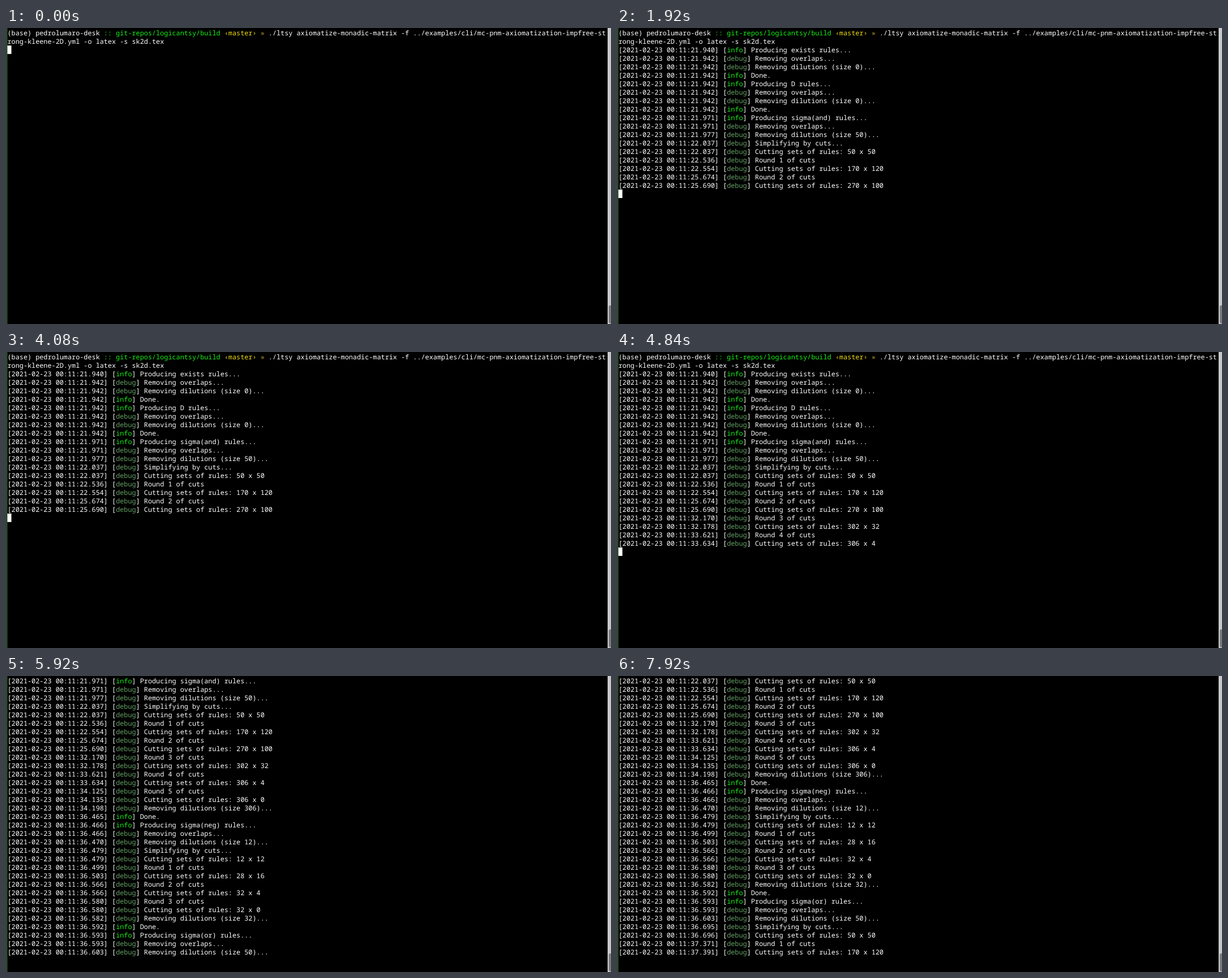
Animation of 1069x524 px, one loop 8 s. Source, as an HTML page:

```html
<!DOCTYPE html>
<html lang="en">
<head>
<meta charset="utf-8">
<title>Terminal log</title>
<style>
  html, body { margin: 0; width: 100%; height: 100%; overflow: hidden; background: #000; }
  svg { display: block; width: 1069px; height: 524px; }
  text {
    font: 500 11.83px "Noto Sans Mono", "DejaVu Sans Mono", monospace;
    fill: #fff; white-space: pre; text-rendering: geometricPrecision;
    font-variant-ligatures: none;
  }
  .green { fill: #18f018; }
  .dim { fill: #65a065; }
  .yellow { fill: #f0dc10; }
  .gold { fill: #c0a818; }
</style>
</head>
<body>
<svg viewBox="0 0 1069 524">
  <rect width="1069" height="524"/>
  <rect x="1" width="1" height="524" fill="#62a05a"/>
  <g id="lines"></g>
  <rect id="cursor" x="2.5" width="7" height="15" fill="#fff"/>
  <rect x="1063" width="6" height="524" fill="#c8c8c8"/>
  <rect x="1065" y="491" width="8" height="32" rx="3" fill="#7c7c7c"/>
</svg>
<script>
const LOOP = 8000, ROW = 15, LAST_ROW = 33;

const log = `21.940 Producing exists rules...
21.942 Removing overlaps...
21.942 Removing dilutions (size 0)...
21.942 Done.
21.942 Producing D rules...
21.942 Removing overlaps...
21.942 Removing dilutions (size 0)...
21.942 Done.
21.971 Producing sigma(and) rules...
21.971 Removing overlaps...
21.977 Removing dilutions (size 50)...
22.037 Simplifying by cuts...
22.037 Cutting sets of rules: 50 x 50
22.536 Round 1 of cuts
22.554 Cutting sets of rules: 170 x 120
25.674 Round 2 of cuts
25.690 Cutting sets of rules: 270 x 100
32.170 Round 3 of cuts
32.178 Cutting sets of rules: 302 x 32
33.621 Round 4 of cuts
33.634 Cutting sets of rules: 306 x 4
34.125 Round 5 of cuts
34.135 Cutting sets of rules: 306 x 0
34.198 Removing dilutions (size 306)...
36.465 Done.
36.466 Producing sigma(neg) rules...
36.466 Removing overlaps...
36.470 Removing dilutions (size 12)...
36.479 Simplifying by cuts...
36.479 Cutting sets of rules: 12 x 12
36.499 Round 1 of cuts
36.503 Cutting sets of rules: 28 x 16
36.566 Round 2 of cuts
36.566 Cutting sets of rules: 32 x 4
36.580 Round 3 of cuts
36.580 Cutting sets of rules: 32 x 0
36.582 Removing dilutions (size 32)...
36.592 Done.
36.593 Producing sigma(or) rules...
36.593 Removing overlaps...
36.603 Removing dilutions (size 50)...
36.695 Simplifying by cuts...
36.696 Cutting sets of rules: 50 x 50
37.371 Round 1 of cuts
37.391 Cutting sets of rules: 170 x 120`;

// A line is a list of [text, colour class] spans.
const prompt = [
  [["(base) pedrolumaro-desk "], [":: git-repos/logicantsy/build ", "green"],
   ["‹master› ", "yellow"], ["» ", "gold"],
   ["./ltsy axiomatize-monadic-matrix -f ../examples/cli/mc-pnm-axiomatization-impfree-st"]],
  [["rong-kleene-2D.yml -o latex -s sk2d.tex"]]
];

function logLine(entry) {
  const message = entry.slice(7);
  const level = /^(Producing|Done)/.test(message) ? ["info", "green"] : ["debug", "dim"];
  return [[`[2021-02-23 00:11:${entry.slice(0, 6)}] [`], level, [`] ${message}`]];
}

// [time, lines printed so far]
const output = [[0, 2], [160, 13], [200, 15], [400, 17], [1640, 19], [4280, 21],
  [4840, 23], [5080, 26], [5840, 34], [5920, 43], [5960, 45], [6240, 47]];

// The cursor starts visible and toggles at each time.
const blinks = [40, 520, 760, 1000, 1200, 1440, 1680, 1920, 2200, 2440, 2640, 2920,
  3160, 3400, 3600, 3880, 4120, 4320, 5080, 5360, 5600, 5840, 5920, 6120,
  6360, 6640, 6880, 7160, 7440, 7640, 7920];

function add(parent, tag, attrs, content = "") {
  const el = document.createElementNS("http://www.w3.org/2000/svg", tag);
  for (const key in attrs) el.setAttribute(key, attrs[key]);
  el.textContent = content;
  return parent.appendChild(el);
}

const group = document.getElementById("lines");
const cursor = document.getElementById("cursor");
const rows = [...prompt, ...log.split("\n").map(logLine)].map((spans, i) => {
  const row = add(group, "text", { x: 2.5, y: 13 + ROW * i });
  for (const [content, color = "white"] of spans) add(row, "tspan", { class: color }, content);
  return row;
});

function draw(t) {
  const printed = output.filter(([start]) => start <= t).pop()[1];
  const scrolled = Math.max(0, printed - LAST_ROW);
  rows.forEach((row, i) => {
    row.style.display = i >= scrolled && i < printed ? "" : "none";
  });
  group.setAttribute("transform", `translate(0 ${-ROW * scrolled})`);
  cursor.setAttribute("y", 1 + ROW * (printed - scrolled));
  cursor.style.display = blinks.filter(time => time <= t).length % 2 ? "none" : "";
}

const start = performance.now();
function tick() {
  draw((performance.now() - start) % LOOP);
  requestAnimationFrame(tick);
}
tick();
</script>
</body>
</html>
```
